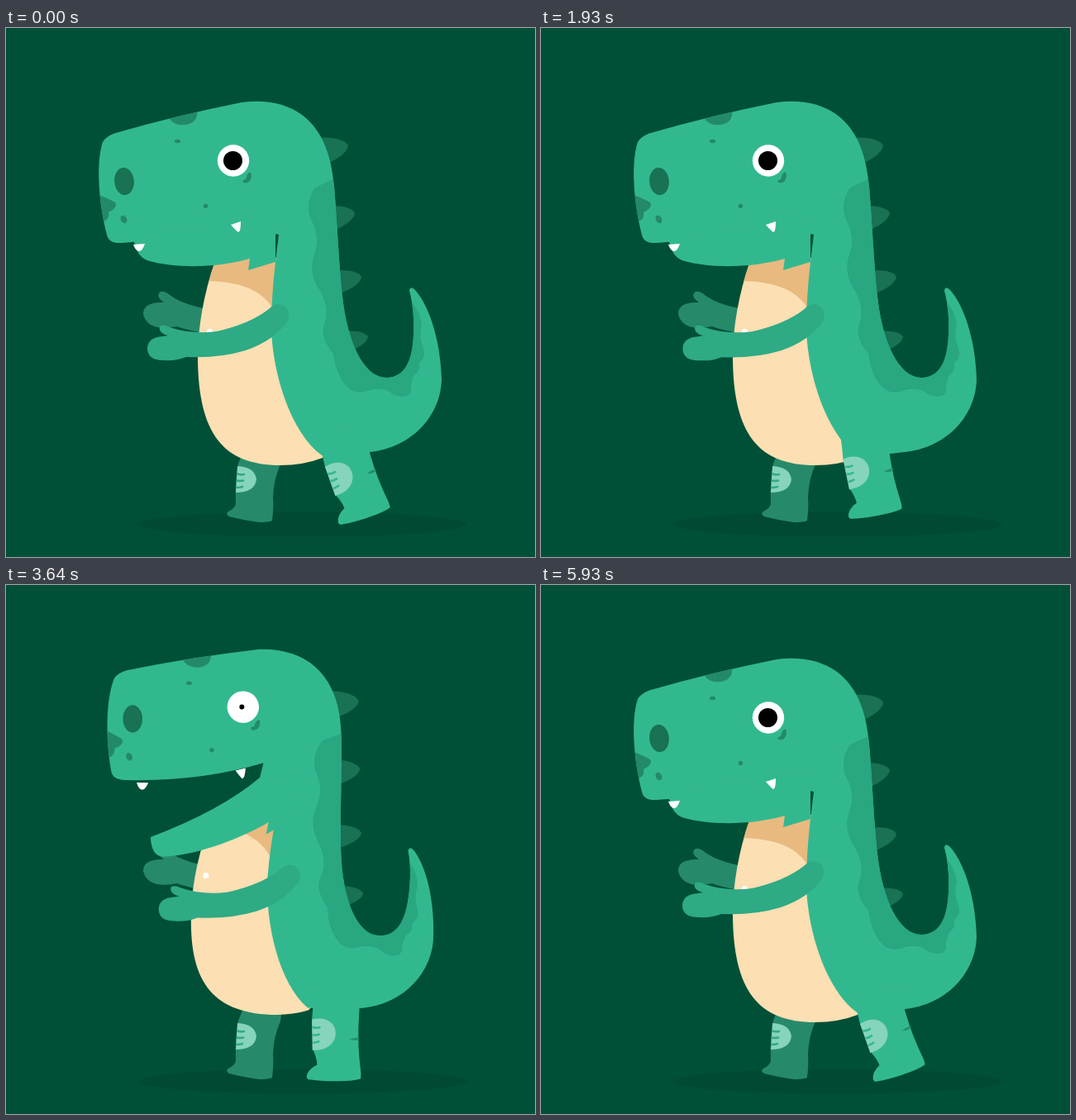
Animation, 640 px wide and 640 px high, one loop 6 s. Source, as an HTML page with a canvas:

```html
<!DOCTYPE html>
<html lang="en">
<head>
<meta charset="utf-8">
<title>Walking dinosaur</title>
<style>
  html, body { margin: 0; width: 100%; height: 100%; overflow: hidden; background: #005037; }
  canvas { display: block; width: 640px; height: 640px; }
</style>
</head>
<body>
<canvas id="stage" width="640" height="640"></canvas>
<script>
const ctx = document.getElementById('stage').getContext('2d');
const LOOP = 6000, STEP = 1500, RAD = Math.PI / 180;

const C = {
  bg: '#005037', ground: '#004a33', skin: '#32b88f', back: '#28a781', arm: '#2eaa84',
  far: '#268a6a', dark: '#187253', spot: '#238a69', belly: '#fcdfb2', shade: '#e8ba7f',
  patch: '#85d4bb', white: '#fff', black: '#000'
};

const shape = {
  body: `M117 138Q120 132 131 127.5Q205 106 285 90C312 86 340 91 358 105C386 126 394 160 397 192
    C401 240 403 290 407 325C413 380 433 423 460 423C493 423 494 380 493 350Q492 332 488 318
    Q489 311 495 317C515 340 526 385 527 425C526 470 490 508 440 513Q410 517 382 517
    C345 490 323 420 321 365Q321 325 326 283L330 250L302 244L305 226Q230 255 140 260
    Q124 261 122 250C113 215 108 165 117 138Z`,
  jaw: `M280 220Q236 246 154 252Q157 277 172 281.5C205 291 255 290.5 295 279
    L293 293L326 283L326 230Z`,
  strip: `M396 183L374 193Q362 210 368 230Q381 252 373 274Q365 297 380 318Q392 340 385 358
    Q379 374 396 394Q400 425 417 438Q428 444 440 438Q458 434 468 443Q485 450 490 440
    Q489 430 494 420Q502 415 500 405Q509 398 505 387Q499 375 503 358Q500 342 492 333
    L486 330L485 400L460 416L430 400L412 330L405 183Z`,
  belly: `M252 285C240 320 232 360 232 400C233 490 262 529 332 529Q360 529 383 520L400 500
    L345 400L330 278L300 278Z`,
  shade: 'M240 283L242 306C275 307 305 312 322 338L332 330L332 276L300 276Z',
  spike: 'M-42 -9Q-7 -12 0 -1Q-1 12 -40 26Z',
  spots: `M196 107L212 95L231 99Q233 112 222 116Q204 121 196 107Z
    M110 201Q125 207 132 211Q136 217 124 223Q126 232 116 235Z
    M292 177Q297 171 297 180Q295 189 287 187Q285 184 290 183Z`,
  teeth: 'M154 262L168 261Q165 270 161 270Q157 270 154 262ZM272 238L284 234Q284 247 281 247Q279 246 272 238Z',
  leg: `M372 490L370 510L368 525L368 562Q372 572 372 580Q360 585 358.5 594L360 597
    Q380 601 405 601Q418 601 424 599Q425 593 424 585Q422 560 424 535L426 514L420 490Z`,
  legPatch: 'M368 525C384 521 397 530 396 543C395 556 383 564 367 562Z',
  legMark: 'M412 551Q418 549 424 549L424 552Q418 553 412 551Z',
  farLeg: `M290 505L281 527Q277 550 278 576Q276 582 269 585Q265 588 270 591Q290 596 306 598
    Q317 598 322 596Q324 580 323 568Q324 545 332 528L335 505Z`,
  farPatch: 'M280 530Q301 531 303 546Q301 562 278 562Z',
  farArm: `M166 346Q166 331 191 332Q180 324 187 319Q192 318 198 323Q216 337 262 343L262 372
    Q225 368 207 361Q171 368 166 346Z`,
  arm: `M318 340Q325 332 335 335Q345 342 341 354Q325 378 290 390Q257 400 218 398Q207 403 190 402
    Q171 402 171 387Q172 374 190 373L196 372Q184 369 186 361Q190 358 198 362Q225 371 255 367
    Q295 358 318 340Z`
};
for (const k in shape) shape[k] = new Path2D(shape[k]);

// Eased 0 to 1 between two times
function ease(t, from, to) {
  const k = Math.min(1, Math.max(0, (t - from) / (to - from)));
  return (1 - Math.cos(Math.PI * k)) / 2;
}

// Rises from a to b, holds, falls from c to d
const pulse = (t, a, b, c, d) => ease(t, a, b) - ease(t, c, d);

function fill(path, color) {
  ctx.fillStyle = color;
  ctx.fill(path);
}

function oval(x, y, rx, ry, color, turn = 0) {
  ctx.fillStyle = color;
  ctx.beginPath();
  ctx.ellipse(x, y, rx, ry, turn * RAD, 0, 2 * Math.PI);
  ctx.fill();
}

function group(draw) {
  ctx.save();
  draw();
  ctx.restore();
}

function clipped(mask, draw) {
  group(() => { ctx.clip(mask); draw(); });
}

function turnAt(x, y, deg) {
  ctx.translate(x, y);
  ctx.rotate(deg * RAD);
  ctx.translate(-x, -y);
}

function stripes(x, y, gap, color) {
  ctx.strokeStyle = color;
  ctx.lineWidth = 2.6;
  ctx.lineCap = 'round';
  ctx.beginPath();
  for (let i = 0; i < 3; i++) {
    const sy = y + i * gap;
    ctx.moveTo(x, sy - 1 + i);
    ctx.quadraticCurveTo(x + 4, sy + 1, x + 9 - i, sy);
  }
  ctx.stroke();
}

function drawFarLeg(t) {
  const step = pulse(t, 700, 970, 1070, 1390);
  group(() => {
    ctx.translate(-22 * step, -11.5 * step);
    fill(shape.farLeg, C.far);
    fill(shape.farPatch, C.patch);
    clipped(shape.farLeg, () => stripes(279, 540, 7.5, '#35a982'));
  });
}

function drawSpikes() {
  for (let i = 0; i < 4; i++) {
    group(() => {
      ctx.translate(414 + 8 * i, 143 + 84 * i - 2.3 * i * i);
      ctx.scale(1.1 - 0.1 * i, 1.1 - 0.1 * i);
      fill(shape.spike, C.dark);
    });
  }
}

// The jaw drops as a shear that grows towards the snout
function drawJaw(open) {
  group(() => {
    ctx.transform(1, -0.4 * open, 0, 1, 22 * open, 136 * open);
    fill(shape.jaw, C.skin);
  });
}

function drawFace(small) {
  oval(207.5, 137, 3.6, 2.2, C.spot, 5);
  oval(241.5, 215.5, 2.7, 2.7, C.spot);
  oval(142.5, 231.5, 3.6, 5, C.spot, -28);
  oval(143, 185.5, 11.8, 16.6, C.dark, -5);
  oval(275, 160.5, 19.2, 19.2, C.white);
  const r = 11.5 - 8.5 * small;
  oval(274.5 - small, 160.5, r, r, C.black);
  fill(shape.teeth, C.white);
}

function drawBody(t, rear) {
  const tilt = 4.6 * pulse(rear, 0, 390, 700, 1250);
  const lift = 3 * pulse(rear, 850, 1030, 1030, 1300) - 11 * pulse(rear, 390, 610, 700, 950);
  group(() => {
    ctx.translate(0, lift);
    turnAt(305, 307, tilt);
    drawSpikes();
    fill(shape.belly, C.belly);
    clipped(shape.belly, () => fill(shape.shade, C.shade));
    oval(246.5, 367.5, 3.6, 3.6, C.white);
    fill(shape.body, C.skin);
    drawJaw(pulse(t, 430, 560, 940, 1070));
    clipped(shape.body, () => {
      fill(shape.strip, C.back);
      fill(shape.spots, C.spot);
    });
    drawFace(pulse(rear, 200, 360, 820, 1000));
  });
}

function drawNearLeg(t) {
  const step = pulse(t, 60, 400, 570, 890);
  const hop = pulse(t, 0, 210, 570, 890);
  const flat = pulse(t, 330, 570, 570, 890);
  group(() => {
    ctx.translate(18 - 22 * step + 4 * flat, 6 - 11 * hop + 5 * flat);
    turnAt(368, 525, 21 * (flat - 1));
    fill(shape.leg, C.skin);
    fill(shape.legPatch, C.patch);
    clipped(shape.leg, () => stripes(368, 535, 8.5, C.skin));
    fill(shape.legMark, '#238f6d');
  });
}

function drawArm(t) {
  const reach = pulse(t, 400, 700, 930, 1300);
  const swing = pulse(t, 930, 1070, 1100, 1430);
  group(() => {
    ctx.translate(15 * reach, 5 * reach);
    turnAt(331, 346, -15 * swing);
    fill(shape.arm, C.arm);
  });
}

function draw(time) {
  const t = time % LOOP, step = t % STEP;
  const rear = t < 3040 ? t - 540 : t - 3040;

  ctx.fillStyle = C.bg;
  ctx.fillRect(0, 0, 640, 640);
  oval(358.5, 600.5, 199, 15, C.ground);
  fill(shape.farArm, C.far);
  drawFarLeg(step);
  drawBody(step, rear);
  drawNearLeg(step);
  drawArm(step);
}

const begin = performance.now();
function tick() {
  draw(performance.now() - begin);
  requestAnimationFrame(tick);
}
tick();
</script>
</body>
</html>
```
